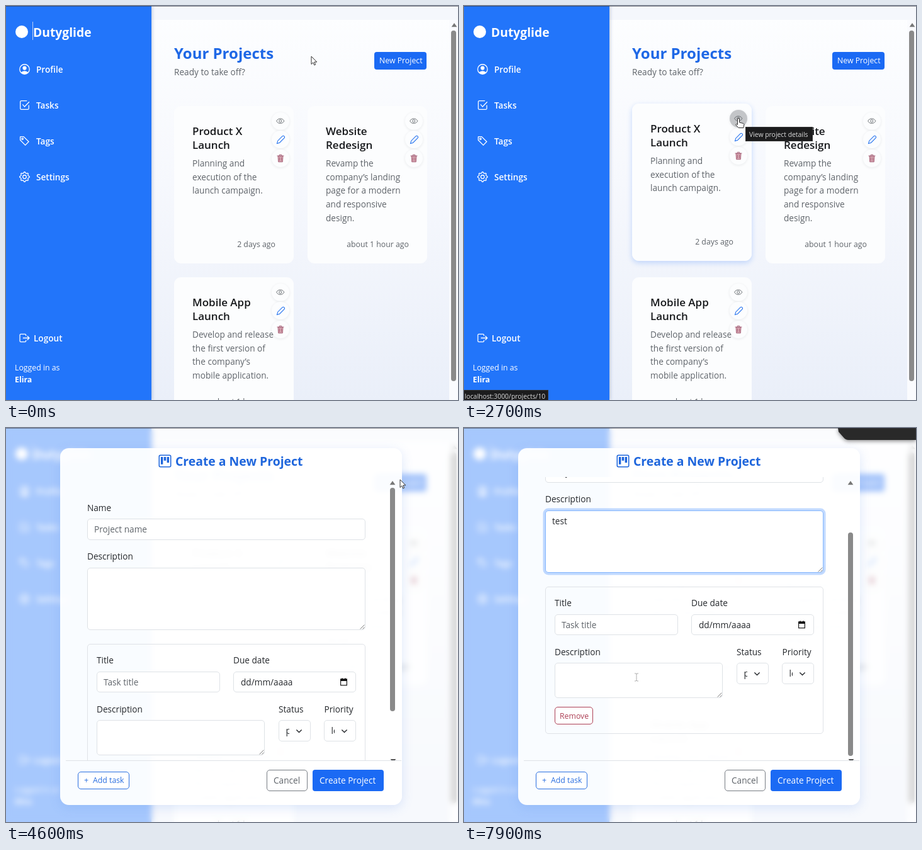
An HTML page for the animation above (8000 ms loop, 718x626 px).

```html
<!DOCTYPE html>
<html lang="en">
<head>
<meta charset="utf-8">
<title>Project planner</title>
<style>
html, body { margin: 0; width: 100%; height: 100%; overflow: hidden; background: #fff; }
#stage { position: absolute; left: 0; top: 0; width: 718px; height: 626px; overflow: hidden;
  font: 13.65px/20px "Open Sans", "Noto Sans", sans-serif; color: #25282c; }
#stage div, #stage span, #stage svg { position: absolute; box-sizing: border-box; white-space: pre; }
#stage .flow { position: static; }
.layer { left: 0; top: 0; width: 718px; height: 626px; }
.side { background: #2275fa; box-shadow: 1px 0 5px rgba(40,70,130,.3); }
.white { color: #fff; }
.nav { color: #fff; font-size: 13.6px; font-weight: 600; }
.brand { color: #fff; font-size: 19.3px; font-weight: 700; }
.s12 { font-size: 12.3px; }
.b { font-weight: 700; }
.h1 { font-size: 24px; font-weight: 700; color: #1f68e6; }
.h2 { font-size: 19.4px; font-weight: 700; color: #1f66dc; }
.h3 { font-size: 17px; font-weight: 600; color: #16181b; }
.h4 { font-size: 13.9px; font-weight: 500; }
.mute { color: #5f646a; }
.r { transform: translateX(-100%); }
.main { background: linear-gradient(#fdfeff, #f6f8fd 45%, #eaeff9); }
.strip { background: #f5f7fc; }
.gutter { background: #fafbfe; }
.logo { background: #fff; border-radius: 50%; }
.caret { background: #b9cff5; }
.edge { background: rgba(50,50,60,.55); }
.card { background: #fcfdfe; border-radius: 11px; }
.glow { border-radius: 11px; box-shadow: 0 3px 9px rgba(30,110,250,.24); }
.round { border-radius: 50%; background: #fcfdfe; box-shadow: 0 1px 4px rgba(30,40,60,.09); }
.blue { background: #1b6af4; border-radius: 4px; }
.line { background: #dfe2e6; }
.thumb { background: #8a8a8a; border-radius: 4px; }
.dark { background: #1c1c1d; color: #dcdcdc; font-size: 10.4px; border: 1px solid #343434; }
.veil { background: rgba(255,255,255,.6); backdrop-filter: blur(5px); }
.dialog { background: rgba(255,255,255,.935); border-radius: 14px; box-shadow: 0 4px 18px rgba(90,140,230,.2); }
.panel { background: #fff; border: 1px solid #d9dce0; border-radius: 5px; box-shadow: 0 1px 3px rgba(0,0,0,.13); }
.field { background: #fff; border: 1px solid #dee2e6; border-radius: 5px; }
.frame { border: 1px solid #dfe2e7; border-radius: 5px; }
.focus { border-color: #86b7fe !important; box-shadow: 0 0 0 3.5px rgba(13,110,253,.25); }
.btn { border: 1px solid #767c83; border-radius: 5px; background: #fff; }
.red { color: #ad3f55; border-color: #ad3f55; }
.link { color: #2a6fe0; border-color: #2a6fe0; }
.badge { background: #ffc423; border-radius: 5px; }
.tiny { font-size: 10.4px; font-weight: 700; color: #28387a; }
.cut { overflow: hidden; }
</style>
</head>
<body>
<div id="stage"></div>
<script>
const stage = document.getElementById('stage');

const box = (x, y, w, h, cls, inner = '', id = '') =>
  `<div id="${id}" class="${cls}" style="left:${x}px;top:${y}px;width:${w}px;height:${h}px">${inner}</div>`;
const layer = (id, inner, css = '', cls = '') => `<div id="${id}" class="layer ${cls}" style="${css}">${inner}</div>`;
const txt = (x, y, s, cls = '', id = '') =>
  `<span id="${id}" class="${cls}" style="left:${x}px;top:${y - 10}px">${s}</span>`;

const solid = 'fill="currentColor" stroke="none"';
const cog = Array.from({ length: 32 }, (_, i) => {
  const a = (i - .5) * Math.PI / 16, r = i % 4 < 2 ? 7.3 : 5.7;
  return (8 + r * Math.cos(a)).toFixed(1) + ',' + (8 + r * Math.sin(a)).toFixed(1);
}).join(' ');
const shapes = {
  user: `<circle cx="8" cy="8" r="7.3"/><g ${solid}><circle cx="8" cy="6.2" r="2.9"/><path d="M2.8 13.2c1.4-3.6 9-3.6 10.4 0A7.5 7.5 0 0 1 2.8 13.2"/></g>`,
  task: '<path d="M14.3 8v5a1.4 1.4 0 0 1-1.4 1.4H3A1.4 1.4 0 0 1 1.6 13V3A1.4 1.4 0 0 1 3 1.6h8.5M5 7l3 3.4L15 3"/>',
  tag: '<path d="M1.5 2v4.6l7.6 7.6 5.1-5.2-7.6-7.5H2z"/><circle cx="4.8" cy="4.8" r="1.2"/>',
  gear: `<circle cx="8" cy="8" r="2.6"/><polygon points="${cog}" stroke-linejoin="round"/>`,
  exit: '<path d="M10 5V3.5Q10 2.3 8.700 2.300H2.300Q1 2.300 1 3.600v8.800q0 1.300 1.300 1.300h6.400q1.300 0 1.300-1.300V11M5.500 8H15M12 5l3 3-3 3"/>',
  eye: '<path d="M.8 8c3-6 11.4-6 14.4 0-3 6-11.4 6-14.4 0z"/><circle cx="8" cy="8" r="2.4"/>',
  pen: '<path d="M1.6 14.4l1.3-4.6 7.7-7.7q1.6-1.5 3.1 0t0 3.1L6 13z"/>',
  bin: '<path d="M3.5 4h9l-.8 10.5H4.3z" fill="#d9a9b4"/><path d="M1.8 3.5h12.4M6 3V1.5h4V3M6.3 6v6.5M9.7 6v6.5"/>',
  board: `<rect x="1" y="1" width="14" height="14" rx="1.5"/><g ${solid}><rect x="3" y="3" width="2.6" height="9"/><rect x="6.7" y="3" width="2.6" height="4.5"/><rect x="10.4" y="3" width="2.6" height="7"/></g>`,
  date: `<rect x="2" y="2.5" width="12" height="12"/><path ${solid} d="M1.5 2h13v4h-13zM4 .5h2v2H4zM10 .5h2v2h-2z"/>`,
  down: '<path d="M2 5l6 6 6-6"/>',
  grip: '<path d="M3 15L15 3M10 15l5-5"/>',
  up: `<path ${solid} d="M8 3l7 10H1z"/>`,
  low: `<path ${solid} d="M8 13l7-10H1z"/>`
};
const icon = (x, y, size, name, color, width = 1.2) =>
  `<svg style="left:${x - size / 2}px;top:${y - size / 2}px;color:${color}" width="${size}" height="${size}" viewBox="0 0 16 16" fill="none" stroke="currentColor" stroke-width="${width}">${shapes[name]}</svg>`;

// Page
const cards = [
  { x: 267, y: 159, h: 250, title: ['Product X', 'Launch'], when: '2 days ago',
    lines: ['Planning and', 'execution of the', 'launch campaign.'] },
  { x: 479, y: 159, h: 250, title: ['Website', 'Redesign'], when: 'about 1 hour ago',
    lines: ['Revamp the', 'company’s landing', 'page for a modern', 'and responsive', 'design.'] },
  { x: 267, y: 431, h: 228, title: ['Mobile App', 'Launch'], when: 'about 1 hour ago',
    lines: ['Develop and release', 'the first version of', 'the company’s', 'mobile application.'] }
];
const tools = [['eye', '#62676c', 13.5], ['pen', '#2170ee', 15], ['bin', '#a25a72', 14]];

const cardHtml = ({ x, y, h, title, lines, when }, i) => layer('card' + i,
  box(x, y, 190, h, 'glow', '', 'glow' + i) + box(x, y, 190, h, 'card') +
  title.map((s, k) => txt(x + 29, y + 40 + 21.7 * k, s, 'h3')).join('') +
  lines.map((s, k) => txt(x + 29, y + 91 + 21.7 * k, s, 'mute')).join('') +
  txt(x + 161, y + h - 30, when, 's12 mute r') +
  tools.map(([name, color, size], k) => {
    const cy = y + 23.5 + 29.5 * k;
    return box(x + 155, cy - 14, 28, 28, 'round', '', name + i) + icon(x + 169, cy, size, name, color, 1.1);
  }).join(''));

const navItems = [['user', 'Profile', 101], ['task', 'Tasks', 158], ['tag', 'Tags', 215], ['gear', 'Settings', 272]];

const page =
  box(231, 0, 487, 626, 'main') +
  layer('', layer('content',
    txt(267, 75, 'Your Projects', 'h1') + txt(267, 105, 'Ready to take off?', 'mute') +
    box(585, 73, 83, 28, 'blue') + txt(593, 87, 'New Project', 's12 white') +
    cards.map(cardHtml).join('')), 'clip-path:inset(22px 14px 0 231px)') +
  box(231, 0, 487, 22, 'strip') + box(704, 22, 14, 604, 'gutter') +
  icon(711.5, 30, 10, 'up', '#777') + box(707, 39, 8, 557, 'thumb', '', 'pageThumb') +
  box(0, 0, 231, 626, 'side') +
  box(15, 31, 20, 20, 'logo') + txt(43, 42, 'Dutyglide', 'brand') +
  box(42, 25, 1, 29, 'caret', '', 'blink') +
  navItems.map(([name, label, y]) => icon(29.5, y - 1, 17, name, '#fff') + txt(48, y, label, 'nav')).join('') +
  icon(29, 527, 17, 'exit', '#fff') + txt(44, 528, 'Logout', 'nav') +
  txt(14, 575, 'Logged in as', 's12 white') + txt(14, 594, 'Elira', 's12 white b') +
  box(447, 192, 107, 23, 'dark', txt(5, 10.5, 'View project details'), 'tip') +
  box(-1, 610, 135, 17, 'dark', txt(1, 8.5, 'localhost:3000/projects/10'), 'status');

// Dialogs
const dialog = (id, x, title, top, body, foot, bar) => layer(id,
  box(86, 32, 543, 567, 'dialog') +
  icon(x, 52.5, 21, 'board', '#1f66dc') + txt(x + 17, 53, title, 'h2') +
  layer('', layer(id + 'Body', body), `clip-path:inset(${top}px 0 98px 0)`) +
  box(95, 528, 533, 1, 'line') + foot + bar);

const task = (y, name, due) => box(155, y, 390, 38, 'frame') + txt(170, y + 19, name, 'b') +
  txt(268, y + 19.5, '— Due ' + due, 's12 mute') +
  box(474, y + 9, 56, 19, 'badge') + txt(481, y + 19, 'Pending', 'tiny');
const fact = (y, name, value) => txt(169, y, name, 'b') + txt(531, y, value, 'r');
const member = (y, name) => icon(177, y, 15, 'user', '#202327') + txt(191, y, name);
const rule = y => box(155, y, 390, 1, 'line');

const details =
  box(140, 109, 420, 82, 'panel') + txt(155, 134, 'Product X Launch', 'h4') +
  txt(155, 161, 'Planning and execution of the launch campaign.', 'mute') +
  box(140, 213, 420, 128, 'panel') + txt(155, 233, 'Tasks', 'h4') +
  task(251, 'Define goals', 'Aug 10, 2025') + task(288, 'Design layout', 'Aug 13, 2025') +
  box(140, 362, 420, 165, 'panel') + txt(155, 387, 'Project Details', 'h4') +
  fact(421, 'Created', 'Aug 06, 2025') + rule(438) +
  fact(458, 'Updated', 'Aug 06, 2025') + rule(475) + fact(495, 'Total tasks', '2') +
  box(140, 549, 420, 128, 'panel') + txt(155, 574, 'Members', 'h4') +
  member(608, 'Ned') + rule(625) + member(645, 'Elira');

const select = (x, s) => box(x, 464, 51, 34, 'field') + box(x + 11.5, 471, 5.5, 20, 'cut', txt(0, 10, s)) +
  icon(x + 32, 481, 11, 'down', '#25282c', 2);

const form =
  txt(129, 127, 'Name') + box(129, 144, 442, 34, 'field', '', 'nameBox') +
  txt(140, 161, '', '', 'name') +
  txt(129, 204, 'Description') + box(129, 222, 442, 99, 'field', '', 'descBox') +
  txt(140, 239, '', '', 'desc') + icon(565, 315, 9, 'grip', '#555', 1.4) +
  box(129, 343, 442, 234, 'frame') +
  txt(144, 369, 'Title') + box(144, 387, 196, 33, 'field') + txt(155, 404, 'Task title', 'mute') +
  txt(361, 369, 'Due date') + box(361, 387, 195, 33, 'field') + txt(373, 404, 'dd/mm/aaaa') +
  icon(536, 403, 13, 'date', '#111', 1.4) +
  txt(144, 447, 'Description') + box(144, 464, 267, 56, 'field') + icon(405, 514, 9, 'grip', '#555', 1.4) +
  txt(433, 447, 'Status') + select(433, 'pending') + txt(505.5, 447, 'Priority') + select(505, 'low') +
  box(144, 534, 61, 28, 'btn red') + txt(152, 548.5, 'Remove', 's12 red');

const formFoot =
  box(114, 546, 82, 28, 'btn link') + txt(124, 560, '+', 's12 link') + txt(138, 560, 'Add task', 's12 link') +
  box(414, 543, 65, 34, 'btn') + txt(425, 560, 'Cancel', 'mute') +
  box(487, 543, 113, 34, 'blue') + txt(498, 560, 'Create Project', 'white');

// Pointers
const pointer = (id, d, fill = '#fff') =>
  `<svg id="${id}" style="left:0;top:0;overflow:visible" width="20" height="20"><path d="${d}" fill="${fill}" stroke="#333"/></svg>`;

stage.innerHTML = page + layer('veil', '', '', 'veil') +
  dialog('info', 285, 'Project details', 85, details,
    box(541, 543, 59, 34, 'btn') + txt(553, 560, 'Close', 'mute'),
    icon(614, 94, 10, 'up', '#777') + box(610, 103, 8, 281, 'thumb', '', 'infoThumb') + icon(614, 520, 10, 'low', '#777')) +
  dialog('make', 252, 'Create a New Project', 78, form, formFoot,
    icon(614, 87, 10, 'up', '#777') + box(610, 95, 8, 355, 'thumb', '', 'makeThumb') +
    box(610, 525, 9, 3, 'cut', icon(4.5, 4, 10, 'low', '#555'))) +
  layer('', pointer('arrow', 'M0 0v12.5l2.9-2.7 1.9 4.2 1.9-.9-1.9-4.1h4z') +
    pointer('hand', 'M-1.5 1a1.5 1.5 0 0 1 3 0v5l6 1.5q1.5.5 1.3 2L8 14.5H0l-4.5-5q1-2 3 0z') +
    pointer('text', 'M-3-6h2l1 1 1-1h2M0-5v10M-3 6h2l1-1 1 1h2', 'none')) +
  '<svg id="notch" style="left:580px;top:0;filter:drop-shadow(0 2px 3px rgba(0,0,0,.45))" width="138" height="32"><path d="M14 0h124v19H31q-5 0-8-4l-8-9z" fill="#292929"/></svg>' +
  box(0, 0, 718, 1, 'edge');

const el = id => document.getElementById(id);

// Motion
const clamp = v => Math.max(0, Math.min(1, v));
const ramp = (t, a, b) => { const p = clamp((t - a) / (b - a)); return p * p * (3 - 2 * p); };

const path = [
  [0, 485, 80], [250, 485, 80], [800, 379, 489], [1850, 379, 489], [2300, 436, 179], [2850, 436, 179],
  [3120, 614, 246], [3200, 614, 246], [3580, 620, 373], [3620, 620, 373], [3920, 571, 557], [4030, 571, 557],
  [4300, 626, 82], [5400, 626, 82], [5850, 293, 157], [6750, 293, 157], [6950, 284, 268], [7300, 284, 268],
  [7800, 274, 396], [8000, 274, 396]
];
function cursorAt(t) {
  const i = path.findIndex(p => p[0] > t);
  const [t0, x0, y0] = path[i - 1], [t1, x1, y1] = path[i];
  const p = ramp(t, t0, t1);
  return [x0 + (x1 - x0) * p, y0 + (y1 - y0) * p];
}
const pageScroll = t => 44 * (ramp(t, 700, 950) - ramp(t, 1880, 2150));

function isOver({ x, y, h }, t) {
  if (t < 0 || (t > 2880 && t < 4100) || t > 4380) return 0;
  const [cx, cy] = cursorAt(t), top = y - pageScroll(t);
  return +(cx > x && cx < x + 190 && cy > top && cy < top + h);
}
// Averaging the recent past gives the lift its short transition.
function hover(card, t) {
  let sum = 0;
  for (let k = 0; k < 8; k++) sum += isOver(card, t - k * 22);
  return sum / 8;
}
function kindAt(t) {
  if ((t > 2200 && t < 2900) || (t > 3880 && t < 4100) || (t > 4260 && t < 4400)) return 'hand';
  return (t > 740 && t < 1980) || t > 5750 ? 'text' : 'arrow';
}

const show = (id, on) => el(id).style.visibility = on ? 'visible' : 'hidden';
const move = (id, x, y) => el(id).style.transform = `translate(${x}px,${y}px)`;

function fade(id, amount) {
  el(id).style.opacity = amount;
  show(id, amount > 0);
  if (id !== 'veil') move(id, 0, -20 * (1 - amount));
}

function typed(id, word, t, start, step, focused, hint) {
  const n = Math.max(0, Math.min(word.length, Math.floor((t - start) / step)));
  const caret = focused && (t - start - n * step) % 1060 < 530;
  const bar = caret ? '<span class="flow" style="border-left:1px solid #222"></span>' : '';
  el(id).innerHTML = n ? word.slice(0, n) + bar : bar + hint;
  el(id).className = n ? '' : 'mute';
}

function draw(t) {
  const scroll = pageScroll(t);
  move('content', 0, -scroll);
  move('pageThumb', 0, scroll * .886);
  cards.forEach((card, i) => {
    const amount = hover(card, t);
    move('card' + i, 0, -4 * amount);
    el('glow' + i).style.opacity = amount;
  });
  show('blink', Math.floor(t / 530) % 2 === 0);

  const onEye = t > 2260 && t < 2880;
  el('eye0').style.background = onEye ? '#c3c5c8' : '';
  show('status', onEye && t > 2330);
  show('tip', onEye && t > 2600);

  const info = ramp(t, 2860, 3020) - ramp(t, 4030, 4160);
  const make = ramp(t, 4390, 4560);
  fade('info', info);
  fade('make', make);
  fade('veil', Math.max(info, make));

  const drag = ramp(t, 3200, 3580);
  move('infoBody', 0, -200 * drag);
  move('infoThumb', 0, 127 * drag);
  el('infoThumb').style.background = t > 3100 && t < 3680 ? '#626262' : '';

  const down = ramp(t, 7400, 7700);
  move('makeBody', 0, -91 * down);
  move('makeThumb', 0, 71 * down);

  const inName = t >= 5920 && t < 6920, inDesc = t >= 6920;
  el('nameBox').classList.toggle('focus', inName);
  el('descBox').classList.toggle('focus', inDesc);
  typed('name', 'Project', t, 5950, 100, inName, 'Project name');
  typed('desc', 'test', t, 6980, 80, inDesc, '');

  const [x, y] = cursorAt(t), kind = kindAt(t);
  for (const id of ['arrow', 'hand', 'text']) show(id, id === kind);
  move(kind, x, y);
  el('text').style.opacity = t > 7700 ? .4 : 1;
  show('notch', t >= 7800);
}

const start = performance.now();
function tick() {
  draw((performance.now() - start) % 8000);
  requestAnimationFrame(tick);
}
tick();
</script>
</body>
</html>
```
